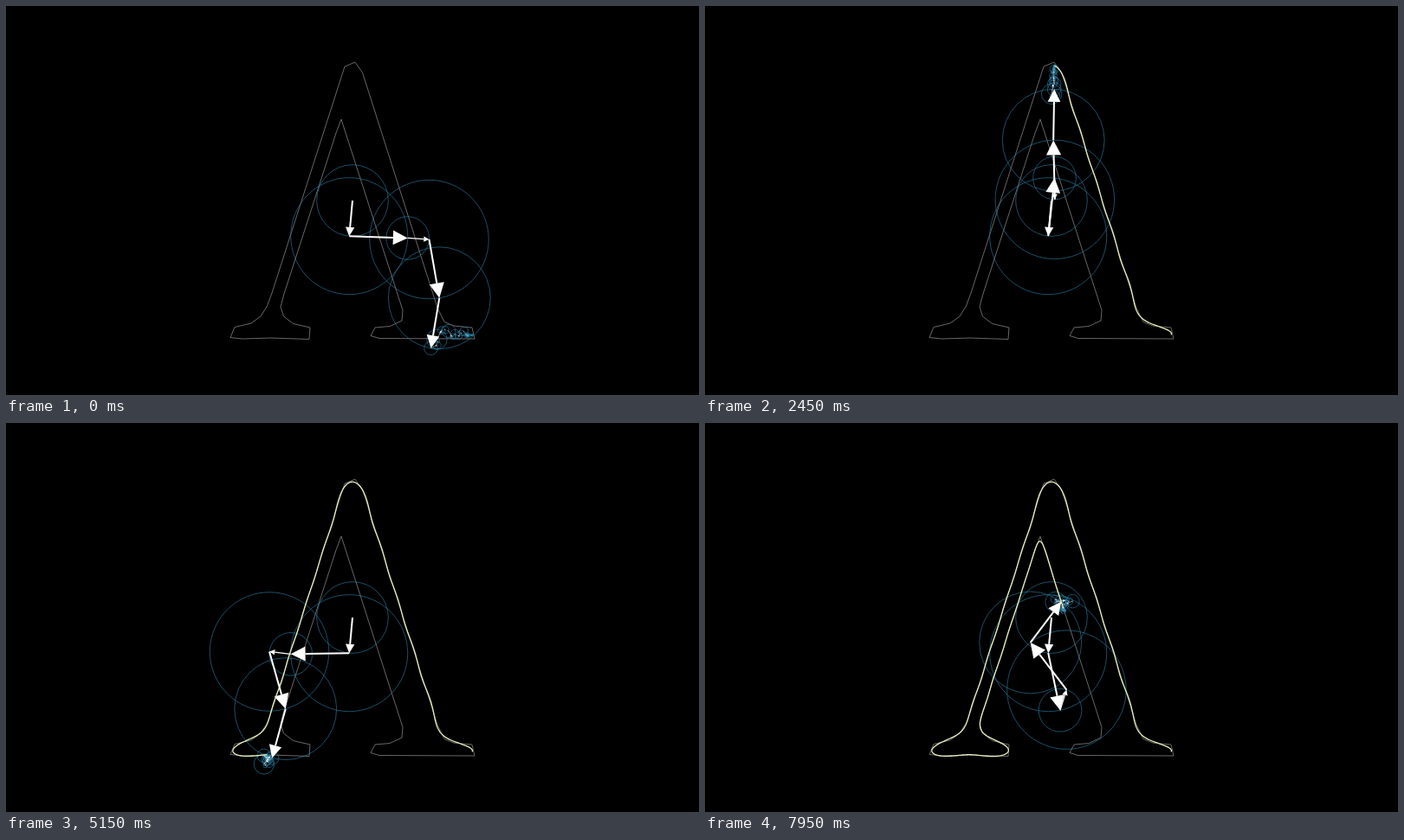
Recreate the animation shown at these times as an HTML page with a canvas. Size 800x450 px, loop 8 s.

```html
<!DOCTYPE html>
<html lang="en">
<head>
<meta charset="utf-8">
<title>Fourier epicycles</title>
<style>
  html, body { margin: 0; width: 100%; height: 100%; overflow: hidden; background: #000; }
  canvas { display: block; width: 800px; height: 450px; }
</style>
</head>
<body>
<canvas id="stage" width="800" height="450"></canvas>
<script>
const ctx = document.getElementById('stage').getContext('2d');
const TAU = Math.PI * 2;
const LOOP = 8000, STEP = 50, CYCLE = 10000, DELAY = 68.5;
const VECTORS = 50, SAMPLES = 4000;
const START_ANGLE = -80.1 * Math.PI / 180; // angle of the n = 2 vector at rest

const corners = [
  [541, 385], [538, 372], [517, 370], [506, 365.5], [498, 349], [411.5, 77],
  [403, 65], [391, 70], [307, 332], [301.5, 347], [294, 359], [283, 367],
  [264, 371.5], [259, 383.5], [273, 385], [306, 384], [350, 385.5], [351, 372],
  [331.5, 367.5], [320.5, 359], [317, 348], [321, 333], [381, 147], [387, 131],
  [458, 352], [457, 364], [443, 370.5], [426, 372], [421, 381.5], [431, 384.5]
].map(([x, y]) => [x - 400, 225 - y]);

// Points spaced evenly by arc length around the closed outline.
function sampleOutline(count) {
  const edges = corners.map((a, i) => {
    const b = corners[(i + 1) % corners.length];
    return { a, b, len: Math.hypot(b[0] - a[0], b[1] - a[1]) };
  });
  const spacing = edges.reduce((sum, e) => sum + e.len, 0) / count;
  const points = [];
  let edge = 0, before = 0;
  for (let i = 0; i < count; i++) {
    const s = (i + 0.5) * spacing;
    while (edge < edges.length - 1 && s > before + edges[edge].len) before += edges[edge++].len;
    const { a, b, len } = edges[edge];
    const k = (s - before) / len;
    points.push([a[0] + (b[0] - a[0]) * k, a[1] + (b[1] - a[1]) * k]);
  }
  return points;
}

function coefficient(points, n) {
  let re = 0, im = 0;
  points.forEach(([x, y], i) => {
    const angle = -TAU * n * (i + 0.5) / points.length;
    const c = Math.cos(angle), s = Math.sin(angle);
    re += x * c - y * s;
    im += x * s + y * c;
  });
  return { n, r: Math.hypot(re, im) / points.length, phase: Math.atan2(im, re) };
}

// Frequencies in the order 0, 1, -1, 2, -2, ...
const outline = sampleOutline(SAMPLES);
const terms = Array.from({ length: VECTORS }, (_, i) =>
  coefficient(outline, i % 2 ? (i + 1) / 2 : -i / 2));

const gap = START_ANGLE - terms.find(t => t.n === 2).phase;
const shift = Math.atan2(Math.sin(gap), Math.cos(gap)) / 2;
terms.forEach(t => { t.phase += t.n * shift; });

function chain(turn) {
  const joints = [[0, 0]];
  let x = 0, y = 0;
  for (const { n, r, phase } of terms) {
    const angle = phase + TAU * n * turn;
    x += r * Math.cos(angle);
    y += r * Math.sin(angle);
    joints.push([x, y]);
  }
  return joints;
}

const TRACE_STEP = 0.001;
const trace = Array.from({ length: 801 }, (_, i) => chain(i * TRACE_STEP)[VECTORS]);

function polyline(points, color, width, closed) {
  ctx.beginPath();
  points.forEach(p => ctx.lineTo(p[0], p[1]));
  if (closed) ctx.closePath();
  ctx.strokeStyle = color;
  ctx.lineWidth = width;
  ctx.stroke();
}

function drawCircle([x, y], r) {
  ctx.beginPath();
  ctx.arc(x, y, r, 0, TAU);
  ctx.strokeStyle = 'rgba(41, 128, 166, 0.62)';
  ctx.lineWidth = 1;
  ctx.stroke();
}

function drawArrow([x0, y0], [x1, y1], r) {
  if (r < 0.05) return;
  const tip = Math.min(19.7, r / 4);
  const ux = (x1 - x0) / r, uy = (y1 - y0) / r;
  const bx = x1 - ux * tip, by = y1 - uy * tip;
  polyline([[x0, y0], [bx, by]], '#fff', Math.min(2, r / 20));
  ctx.beginPath();
  ctx.moveTo(x1, y1);
  ctx.lineTo(bx - uy * tip / 2, by + ux * tip / 2);
  ctx.lineTo(bx + uy * tip / 2, by - ux * tip / 2);
  ctx.fillStyle = '#fff';
  ctx.fill();
}

function draw(ms) {
  const turn = Math.max(0, ms - DELAY) / CYCLE;
  const joints = chain(turn);
  ctx.setTransform(1, 0, 0, 1, 0, 0);
  ctx.fillStyle = '#000';
  ctx.fillRect(0, 0, 800, 450);
  ctx.setTransform(1, 0, 0, -1, 400, 225);
  ctx.lineJoin = 'round';

  polyline(corners, '#737373', 0.9, true);
  terms.forEach((t, i) => drawCircle(joints[i], t.r));
  terms.forEach((t, i) => drawArrow(joints[i], joints[i + 1], t.r));
  if (turn > 0) {
    const done = trace.slice(0, Math.floor(turn / TRACE_STEP) + 1);
    polyline([...done, joints[VECTORS]], '#e4f0ba', 1.3);
  }
}

function frame() {
  draw(Math.floor(performance.now() % LOOP / STEP) * STEP);
  requestAnimationFrame(frame);
}
frame();
</script>
</body>
</html>
```
